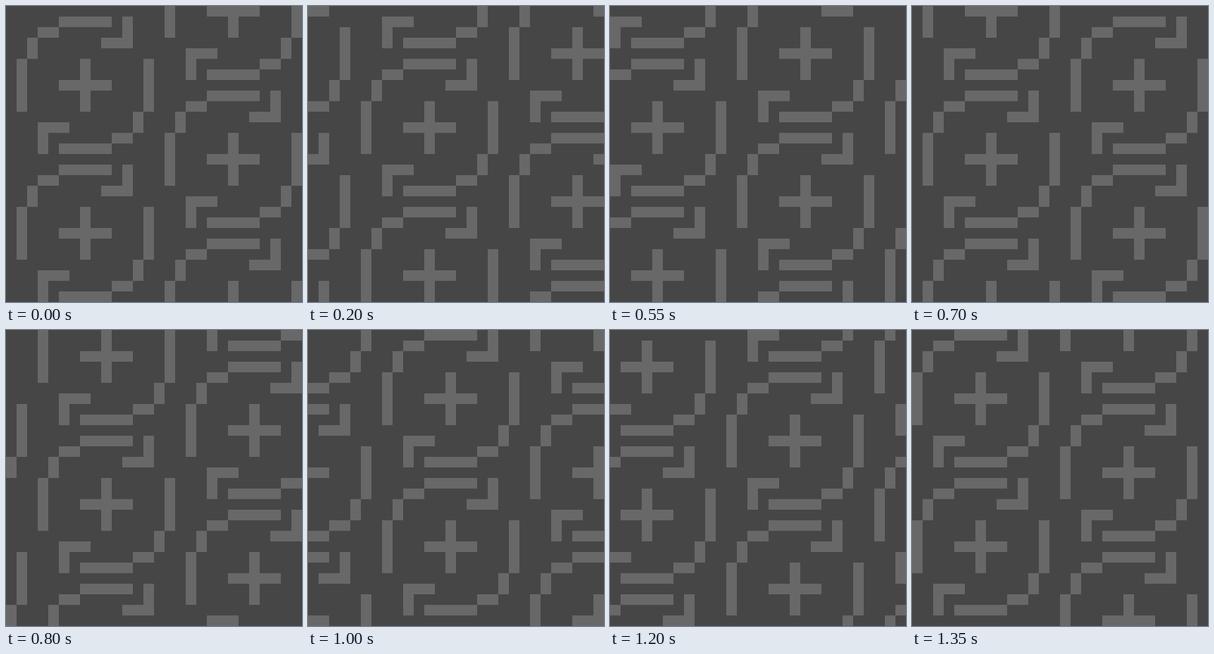
Recreate the animation shown at these times as an HTML page with a canvas. Size 448 px wide and 448 px high, loop 1400 ms.

```html
<!DOCTYPE html>
<html lang="en">
<head>
<meta charset="utf-8">
<title>Drifting cells</title>
<style>
  html, body { margin: 0; width: 100%; height: 100%; overflow: hidden; background: #464646; }
  canvas { display: block; }
</style>
</head>
<body>
<canvas id="stage" width="448" height="448"></canvas>
<script>
const ctx = document.getElementById('stage').getContext('2d');
const CELL = 16, GRID = 28, PERIOD = 14, STEP_MS = 50;

const mod = (a, n) => ((a % n) + n) % n;

// Is the cell lit, with x and y measured from the centre of its motif?
function isLit(x, y) {
  const u = Math.abs(x), v = Math.abs(y), r = Math.hypot(x, y);
  const plus = x * y === 0 && r <= 2;
  const bar = Math.min(u, v) <= 2;
  const ring = r > 5.8 && r < 6.5 && (bar || x * y > 0);
  const corner = x * y < 0 &&
    (u === 4 && v >= 4 && v <= 6 || v === 4 && u >= 2 && u <= 4);
  return plus || ring || corner;
}

function draw() {
  const step = Math.floor(performance.now() / STEP_MS) % GRID;
  ctx.fillStyle = '#464646';
  ctx.fillRect(0, 0, GRID * CELL, GRID * CELL);
  ctx.fillStyle = '#686868';
  for (let i = 0; i < GRID; i++) {
    // Each column of motifs sits half a period lower than the one before
    const column = Math.floor((i - step) / PERIOD);
    const x = mod(i - step, PERIOD) - PERIOD / 2;
    for (let j = 0; j < GRID; j++) {
      const y = mod(j - step - column * PERIOD / 2, PERIOD) - PERIOD / 2;
      if (isLit(x, y)) ctx.fillRect(i * CELL, j * CELL, CELL, CELL);
    }
  }
  requestAnimationFrame(draw);
}
draw();
</script>
</body>
</html>
```
